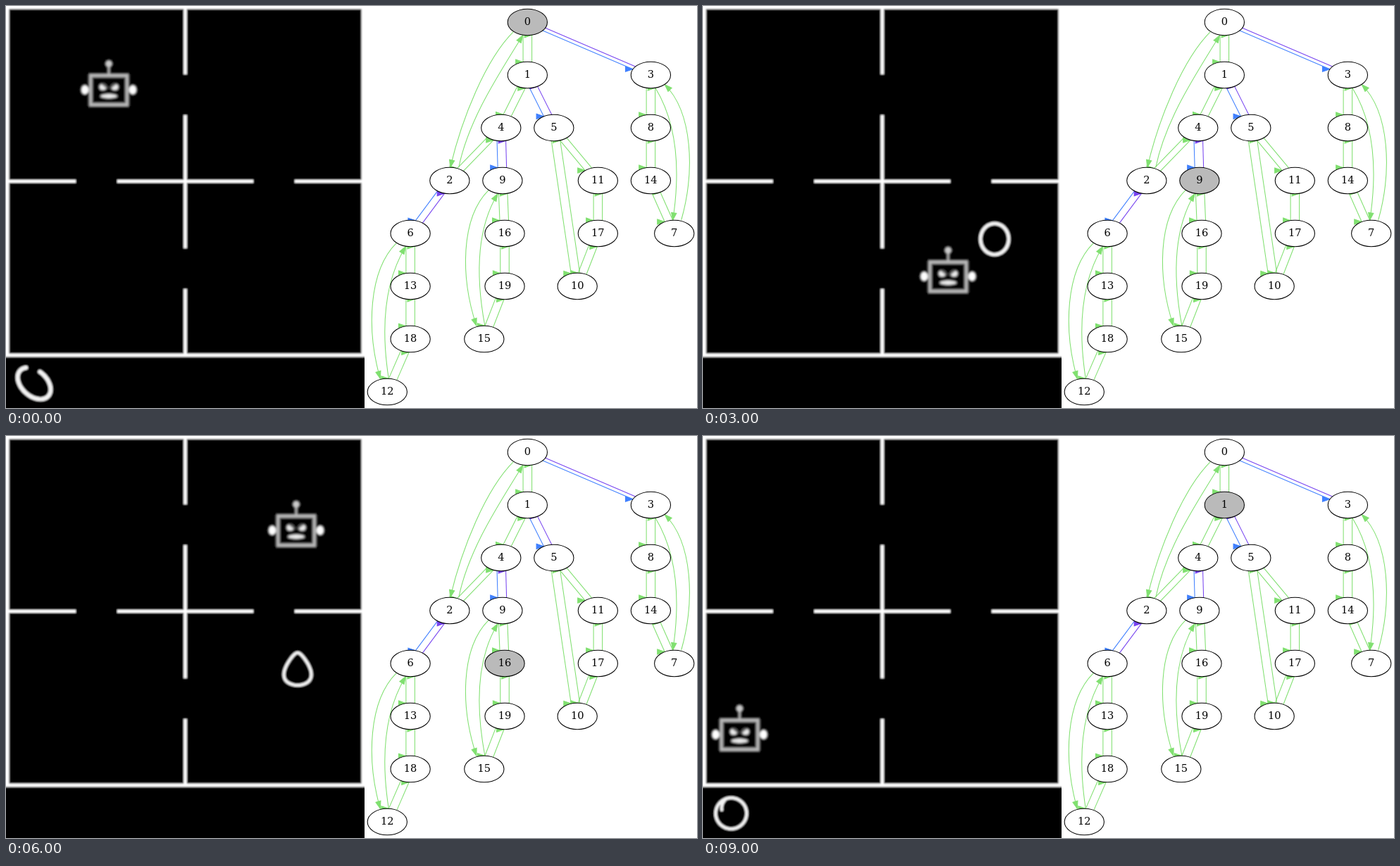
Write an HTML page that moves like this. It is 981 px wide and 571 px high and loops after 10000 ms.

```html
<!DOCTYPE html>
<html>
<head>
<meta charset="utf-8">
<style>
  html, body { margin: 0; width: 100%; height: 100%; overflow: hidden; background: #fff; }
  svg { display: block; }
  text { font: 14px "DejaVu Serif", serif; text-anchor: middle; }
</style>
</head>
<body>
<svg width="981" height="571" viewBox="0 0 981 571">
  <defs>
    <clipPath id="panel"><path d="M0 0H509V571H0Z"/></clipPath>
    <filter id="soft" filterUnits="userSpaceOnUse" x="-20" y="-20" width="560" height="620"><feGaussianBlur stdDeviation="1.1"/></filter>
    <filter id="softer" x="-20%" y="-20%" width="140%" height="140%"><feGaussianBlur stdDeviation="1.2"/></filter>
  </defs>
  <g clip-path="url(#panel)">
    <g filter="url(#soft)">
      <path fill="#fff" d="M-20-20H540V600H-20Z"/>
      <path d="M4.5 4.5H504.5V493.5H4.5ZM-20 498.5H540V600H-20Z"/>
      <path fill="none" stroke="#fff" stroke-width="4.6"
        d="M254.5 4V97M254.5 155V344M254.5 402V494M4 249H99M158 249H351M410 249H505"/>
      <path id="zero" fill="none" stroke="#f2f2f2" stroke-linecap="round" stroke-linejoin="round"/>
      <g id="robot" filter="url(#softer)">
        <path d="M0-23V-33" stroke="#aaa" stroke-width="4"/>
        <circle cy="-37" r="5" fill="#ccc"/>
        <ellipse cx="-34" rx="5.5" ry="7" fill="#fff"/>
        <ellipse cx="34" rx="5.5" ry="7" fill="#fff"/>
        <rect x="-26" y="-20.5" width="52" height="42" stroke="#b8b8b8" stroke-width="5"/>
        <ellipse cx="-8.5" cy="-4" rx="5" ry="4.5" fill="#eee"/>
        <ellipse cx="8.5" cy="-4" rx="5" ry="4.5" fill="#eee"/>
        <path d="M-10-9L-1-2M10-9L1-2" stroke="#555" stroke-width="2.5"/>
        <ellipse cy="9" rx="12" ry="3" fill="#eee"/>
      </g>
    </g>
  </g>
  <g transform="translate(509) scale(1.042)"><g id="edges"></g><g id="nodes"></g></g>
</svg>
<script>
const $ = id => document.getElementById(id);
const GREEN = '#80e070', BLUE = '#4080ff', PURPLE = '#7744f0';
const RX = 27, RY = 18, ROW = 72, SHIFT = 6;

function add(parent, tag, attrs) {
  const el = document.createElementNS('http://www.w3.org/2000/svg', tag);
  for (const key in attrs) el.setAttribute(key, attrs[key]);
  return parent.appendChild(el);
}

// Each loop visits the four rooms, one row per room.
const loops = [
  { row: 0, ids: [0, 1, 4, 2], xs: [222, 222, 186, 116] },
  { row: 1, ids: [3, 8, 14, 7], xs: [390, 390, 390, 422] },
  { row: 2, ids: [5, 11, 17, 10], xs: [258, 318, 318, 290] },
  { row: 3, ids: [9, 16, 19, 15], xs: [188, 191, 191, 163] },
  { row: 4, ids: [6, 13, 18, 12], xs: [62.5, 62.5, 62.5, 31] }
];
const centers = [];
for (const { row, ids, xs } of loops)
  ids.forEach((id, i) => centers[id] = [xs[i], 22 + ROW * (row + i)]);

const plus = ([x, y], dx, dy) => [x + dx, y + dy];

function arrow(from, c1, c2, to, color) {
  add($('edges'), 'path', { d: `M${from}C${c1} ${c2} ${to}`, fill: 'none', stroke: color });
  const angle = Math.atan2(to[1] - c2[1], to[0] - c2[0]) * 180 / Math.PI;
  add($('edges'), 'path', {
    d: 'M0 0L-10-3.5V3.5Z', fill: color, stroke: color,
    transform: `translate(${to}) rotate(${angle})`
  });
}

// The point where the shifted centre line leaves the ellipse of node a.
function exit(a, b, shift) {
  const dx = centers[b][0] - centers[a][0], dy = centers[b][1] - centers[a][1];
  let t = 0;
  while (Math.hypot((shift + t * dx) / RX, t * dy / RY) < 1) t += 0.002;
  return plus(centers[a], shift + t * dx, t * dy);
}

function straight(a, b, color) {
  const shift = centers[b][1] > centers[a][1] ? -SHIFT : SHIFT;
  const from = exit(a, b, shift), to = exit(b, a, shift);
  arrow(from, from, to, to, color);
}

function link(a, b, down = GREEN, up = GREEN) {
  straight(a, b, down);
  straight(b, a, up);
}

// Two nested arcs between the first and last node of a loop, bulging towards the last.
function arcs(first, last) {
  const a = centers[first], d = centers[last];
  const dx = d[0] - a[0], side = Math.sign(dx);
  const outerA = plus(a, side * 19, 13), outerD = plus(d, side * 14 - 0.14 * dx, -RY);
  const innerA = plus(a, side * 6.5, RY), innerD = plus(d, side * 2.5 - 0.14 * dx, -RY);
  const outer = [outerA, plus(outerA, side * 38, 38), plus(outerD, side * 34 - 0.47 * dx, -67), outerD];
  const inner = [innerA, plus(innerA, side * 29, 48), plus(innerD, side * 21 - 0.33 * dx, -68), innerD];
  const [down, up] = side < 0 ? [outer, inner] : [inner, outer];
  arrow(...down, GREEN);
  arrow(...up.reverse(), GREEN);
}

for (const { ids: [a, b, c, d], xs } of loops) {
  link(a, b);
  link(b, c);
  link(c, d);
  const blocked = xs[1] > xs[3] && xs[3] > xs[0];
  (blocked ? link : arcs)(a, d);
}
// Every room of the first loop leads to one of the other loops.
loops[0].ids.forEach((id, i) => link(id, [3, 5, 9, 6][i], BLUE, PURPLE));

const ellipses = centers.map(([x, y], id) => {
  const el = add($('nodes'), 'ellipse', { cx: x, cy: y, rx: RX, ry: RY, stroke: '#000' });
  add($('nodes'), 'text', { x, y: y + 3.7 }).textContent = id;
  return el;
});

// A handwritten zero: a tilted ring, narrowed at the top by taper, curling inwards past one turn.
function ring([cx, cy], { w, h, tilt = 0, turns = 1, taper = 0 }) {
  const lean = tilt * Math.PI / 180, points = [];
  for (let t = 0; t <= turns; t += 0.02) {
    const angle = -1.9 - lean - t * 2 * Math.PI;
    const size = 1 - 2.5 * Math.max(0, t - 1);
    const x = w * size * Math.cos(angle) * (1 + taper * Math.sin(angle));
    const y = h * size * Math.sin(angle);
    points.push([cx + x * Math.cos(lean) - y * Math.sin(lean), cy + x * Math.sin(lean) + y * Math.cos(lean)]);
  }
  return 'M' + points.join('L');
}

const HELD = [40, 536], DROPPED = [414, 331];
const pose = (node, x, y, zero) => ({ node, x, y, zero });
const poses = [
  pose(0, 146, 119, { w: 27, h: 18, tilt: 42, turns: 0.87, pen: 6 }),
  pose(2, 348, 86, { w: 24, h: 22, tilt: -30, turns: 1.25, pen: 6 }),
  pose(4, 417, 356, { w: 26, h: 18, tilt: 32, pen: 4 }),
  pose(9, 348, 384, { w: 20, h: 22, pen: 5 }),
  pose(15, 111, 352, { w: 27, h: 15, tilt: -30, pen: 4.5 }),
  pose(19, 81, 56, { w: 20, h: 22, pen: 5 }),
  pose(16, 412, 134, { w: 18, h: 23, taper: 0.45, pen: 4.5 }),
  pose(9, 348, 385, { w: 10, h: 21, tilt: 16, pen: 7.5 }),
  pose(4, 417, 356, { w: 21, h: 23, pen: 5 }),
  pose(1, 52, 424, { w: 22, h: 22, turns: 1.15, pen: 4.5 })
];

function frame() {
  const { node, x, y, zero } = poses[Math.floor(performance.now() / 1000) % poses.length];
  const dropped = loops[3].ids.includes(node);
  ellipses.forEach((el, id) => el.setAttribute('fill', id === node ? '#bababa' : '#fff'));
  $('robot').setAttribute('transform', `translate(${x} ${y})`);
  $('zero').setAttribute('d', ring(dropped ? DROPPED : HELD, zero));
  $('zero').setAttribute('stroke-width', zero.pen);
  requestAnimationFrame(frame);
}
frame();
</script>
</body>
</html>
```
